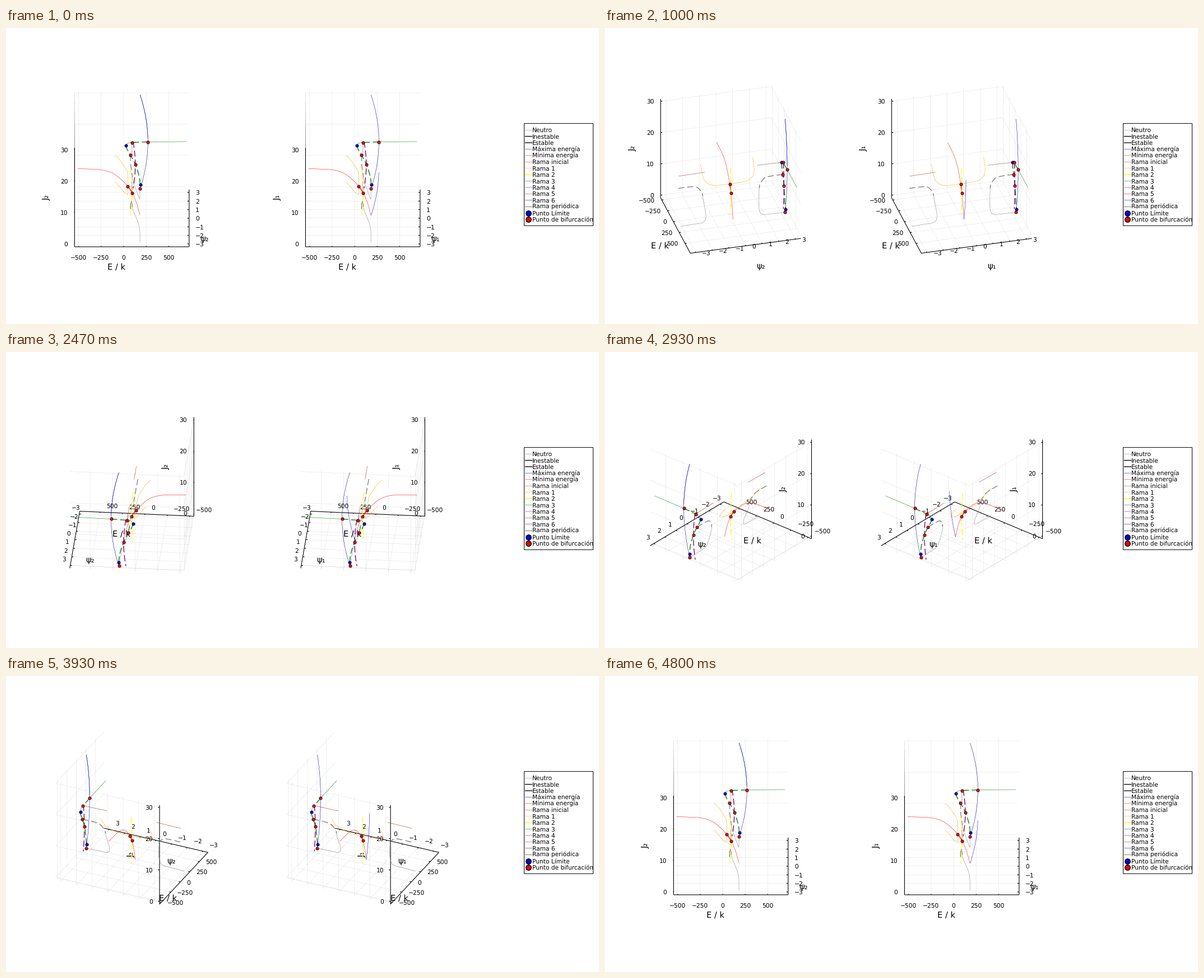
A matplotlib script for the animation above (4.87 s loop, 1058 by 529 pixels).

```python
import numpy as np
import matplotlib.pyplot as plt
from matplotlib.animation import FuncAnimation
from matplotlib.collections import LineCollection
from matplotlib.patches import Rectangle

W, H = 1058, 529
LOOP_MS, STEPS, HOLD = 4870, 73, 3      # 73 camera steps of 5 degrees
CENTERS, CY, HALF = (224.5, 636.6), 251.4, 102.2
SIN_EL, COS_EL = 0.5, np.sqrt(3) / 2
TICK_SIZE, LABEL_SIZE = 10.67, 14.67
THIN, THICK = 0.52, 1.35
GAP = np.full((1, 3), np.nan)

plt.rcParams.update({"font.family": "DejaVu Sans", "lines.scale_dashes": False,
                     "path.snap": False, "text.hinting": "no_hinting"})

# Everything lives in a cube of half side 1; each axis has a 3 % margin.
END = 1 / 1.06                          # psi = pi, J at its extremes


def energy(v):
    return (v - 90.6) / 636.6


def angle(v):
    return v / np.pi * END


def action(v):
    return (v / 14.93 - 1) * END


def smooth(points, n=10):
    """Catmull-Rom curve through the points."""
    p = np.asarray(points, float)
    p = np.vstack([2 * p[0] - p[1], p, 2 * p[-1] - p[-2]])
    t = np.linspace(0, 1, n, endpoint=False)[:, None]
    out = []
    for a, b, c, d in zip(p, p[1:], p[2:], p[3:]):
        out.append(b + 0.5 * t * (c - a + t * (2 * a - 5 * b + 4 * c - d
                                               + t * (3 * (b - c) + d - a))))
    return np.vstack(out + [p[-2:-1]])


def at_psi(psi, ez):
    return [(e, psi, z) for e, z in ez]


def mirror(curve):
    return curve * (1, -1, 1)


def arc(psi, z0, z1, z_mid, e_mid, bend, half):
    z = np.linspace(z0, z1, 40)
    e = e_mid - bend * ((z - z_mid) / half) ** 2
    return np.column_stack([e, np.full_like(z, psi), z])


# Bifurcation and limit points
B_TOP, B_RIGHT, B_LOW = (.002, END, -.0148), (.2808, END, -.0035), (.1419, END, -END)
B_UP, B_MID = (-.0225, END, -.269), (.0607, END, -.4577)
B_RED1, B_RED2 = (-.0714, 0, -.3514), (.0049, 0, -.487)
L_TOP, L_LOW = (-.1057, END, -.076), (.1487, END, -.8734)

minimum = smooth(at_psi(0, [(-.947, 0), (-.634, -.0124), (-.438, -.046), (-.2916, -.12),
                            (-.184, -.2215), (-.0714, -.3514), (.0049, -.487),
                            (.08, -.685), (.1435, -END)]))
branch1 = smooth([B_RED1, (-.07, .2, -.345), (-.07, .342, -.3175), (-.095, .42, -.265),
                  (-.135, .455, -.213), (-.2, .47, -.107), (-.2916, END / 2, 0)])
branch2 = arc(0, 0, -END, -END / 2, .005, .025, END / 2)
branch3_end = np.array([(.944, END, .002), B_RIGHT])
branch3_top = np.array([B_RIGHT, B_TOP])
branch3_turn = smooth([B_TOP, (-.07, END, -.028), L_TOP])
branch3_down = smooth([L_TOP, (-.08, END, -.16), B_UP, B_MID, (.127, END, -.69), L_LOW])
branch4 = arc(END, 0, -END, -END / 2, .0607, .04, END / 2)
branch5 = np.array([(.003, END / 2, 0), (.003, END, -.008)])
branch6 = arc(END, END, -END, 0, .2808, .137, END)
loop_dash = smooth([B_UP, (-.021, .767, -.268), (-.018, .615, -.29),
                    (0, .529, -.391), (.01, .51, -.47)])
loop_thin = smooth([(.01, .51, -.47), (.024, .503, -.5566), (.11, .479, -.808),
                    (.138, .532, -.922), (.142, .724, -.936), B_LOW])
maximum = (arc(END, .075, END, 0, .2808, .137, END),
           arc(0, -.075, -END, 0, .2808, .137, END))

DASH = (0, (11, 5))
SERIES = [  # colour, width, style, curves
    ("gray", THIN, "-", [loop_thin, mirror(loop_thin), np.array([L_LOW, B_LOW])]),
    ("gray", THICK, DASH, [loop_dash, mirror(loop_dash)]),
    ("red", THIN, "-", [minimum]),
    ("red", THICK, "-", [smooth([B_RED1, (-.03, 0, -.42), B_RED2])]),
    ("orange", THIN, "-", [branch1, mirror(branch1)]),
    ("yellow", THICK, DASH, [branch2]),
    ("green", THIN, "-", [branch3_end, branch3_turn]),
    ("green", THICK, DASH, [branch3_top, branch3_down]),
    ("purple", THICK, DASH, [branch4]),
    ("brown", THIN, "-", [branch5, mirror(branch5)]),
    ("navy", THIN, "-", [branch6]),
]
MARKERS = [("blue", [L_TOP, L_LOW]),
           ("red", [B_TOP, B_RIGHT, B_UP, B_MID, B_LOW, B_RED1, B_RED2])]

E_TICKS = [-500, -250, 0, 250, 500]
PSI_TICKS = [-3, -2, -1, 0, 1, 2, 3]
J_TICKS = [0, 10, 20, 30]


def build_grid():
    segs = []
    for e in map(energy, E_TICKS):
        segs += [[(e, -1, -1), (e, 1, -1)], [(e, 1, -1), (e, 1, 1)]]
    for p in map(angle, PSI_TICKS):
        segs += [[(-1, p, -1), (1, p, -1)], [(-1, p, -1), (-1, p, 1)]]
    for z in map(action, J_TICKS):
        segs += [[(-1, 1, z), (1, 1, z)], [(-1, -1, z), (-1, 1, z)]]
    return np.array(segs, float)


def build_axes():
    tick = 0.03
    segs = [[(-1, -1, -1), (1, -1, -1)], [(1, -1, -1), (1, 1, -1)],
            [(-1, -1, -1), (-1, -1, 1)]]
    segs += [[(e, -1, -1), (e, -1 + tick, -1)] for e in map(energy, E_TICKS)]
    segs += [[(1, p, -1), (1 - tick, p, -1)] for p in map(angle, PSI_TICKS)]
    segs += [[(-1, -1, z), (-1, -1 + tick, z)] for z in map(action, J_TICKS)]
    return np.array(segs, float)


GRID, AXES = build_grid(), build_axes()


def project(points, azimuth, cx):
    e, p, z = np.moveaxis(np.asarray(points, float), -1, 0)
    a = np.radians(azimuth)
    x = cx + HALF * (e * np.cos(a) + p * np.sin(a))
    depth = p * np.cos(a) - e * np.sin(a)
    return np.stack([x, CY - HALF * (COS_EL * z + SIN_EL * depth)], -1)


def project_both(points, azimuth):
    return np.concatenate([project(points, azimuth, cx) for cx in CENTERS])


def tick_offset(phase):
    """Alignment and shift of tick labels for an axis turned by phase degrees."""
    phase %= 360
    if phase < 90:
        return "left", 11.3, 0.5
    if phase == 90:
        return "center", 0, 19
    if phase <= 180:
        return "right", -12, 0.2
    if phase < 270:
        return "left", -14, -11.2
    if phase == 270:
        return "center", 0, -11.2
    return "left", 11.3, -11.2


fig = plt.figure(figsize=(W / 72, H / 72), dpi=72, facecolor="white")
ax = fig.add_axes([0, 0, 1, 1])
ax.set(xlim=(0, W), ylim=(H, 0))
ax.axis("off")


def add_text(s, size, x=0, y=0, **kw):
    return ax.text(x, y, s, fontsize=size, va="baseline", zorder=3, **kw)


grid = ax.add_collection(LineCollection([], colors="black", alpha=0.1, linewidths=0.6, zorder=1))
frame_lines = ax.add_collection(LineCollection([], colors="black", linewidths=1.1, zorder=2))


def add_line(color, width, style="-"):
    return ax.plot([], [], color=color, lw=width, ls=style, zorder=4,
                   dash_capstyle="butt", solid_capstyle="butt")[0]


lines = []
for color, width, style, curves in SERIES:
    path = np.vstack([part for c in curves for part in (c, GAP)])
    lines.append((add_line(color, width, style), path))
max_lines = [add_line("blue", THIN) for _ in CENTERS]
dots = [(ax.plot([], [], "o", ms=5.2, mfc=color, mec="black", mew=0.8, zorder=5)[0], pts)
        for color, pts in MARKERS]

ticks, titles = [], []                  # (text, axis, point, panel centre)
for cx, sub in zip(CENTERS, "₂₁"):
    places = [("E", v, (energy(v), -1, -1)) for v in E_TICKS]
    places += [("psi", v, (1, angle(v), -1)) for v in PSI_TICKS]
    places += [("J", v, (-1, -1, action(v))) for v in J_TICKS]
    for axis, v, point in places:
        ticks.append((add_text(str(v).replace("-", "−"), TICK_SIZE), axis, point, cx))
    for s, point, shift, turn in [("E / k", (0, -1, -1), (-27.7, 40.5), 0),
                                  ("ψ" + sub, (1, 0, -1), (27.2, 40.9), 0),
                                  ("J" + sub, (-1, -1, 0), (-45.8, 0), 90)]:
        text = add_text(s, LABEL_SIZE, ha="center", rotation=turn, rotation_mode="anchor")
        titles.append((text, point, shift, cx))


def draw_legend():
    ax.add_patch(Rectangle((924.5, 170.6), 123, 182.7, fc="white", ec="black", lw=1, zorder=2))
    rows = [("Neutro", "gray", THIN), ("Inestable", "black", THICK),
            ("Estable", "black", THICK), ("Máxima energía", "blue", THIN),
            ("Mínima energía", "red", THIN), ("Rama inicial", "sienna", THIN),
            ("Rama 1", "orange", THIN), ("Rama 2", "yellow", THICK),
            ("Rama 3", "green", THIN), ("Rama 4", "purple", THIN),
            ("Rama 5", "brown", THIN), ("Rama 6", "navy", THIN),
            ("Rama periódica", "black", THIN),
            ("Punto Límite", "blue", None), ("Punto de bifurcación", "red", None)]
    for i, (name, color, width) in enumerate(rows):
        y = 182.2 + 11.42 * i
        if width:
            ax.plot([926.5, 938.5], [y, y], color=color, lw=width, zorder=3)
        else:
            ax.plot(932.3, y, "o", ms=9.3, mfc=color, mec="black", mew=1.5, zorder=3)
        add_text(name, TICK_SIZE, 939.3, y + 3.9)


draw_legend()


def update(frame):
    azimuth = 5 * min((frame + 1) // HOLD, STEPS - 1) % 360
    grid.set_segments(project_both(GRID, azimuth))
    frame_lines.set_segments(project_both(AXES, azimuth))
    for line, path in lines:
        line.set_data(*project_both(path, azimuth).T)
    for line, path, cx in zip(max_lines, maximum, CENTERS):
        line.set_data(*project(path, azimuth, cx).T)
    for dot, points in dots:
        dot.set_data(*project_both(points, azimuth).T)

    placing = {"E": tick_offset(azimuth + 90), "psi": tick_offset(azimuth),
               "J": ("right", -12, 0)}
    for text, axis, point, cx in ticks:
        align, dx, dy = placing[axis]
        x, y = project(point, azimuth, cx)
        text.set_ha(align)
        text.set_position((x + dx, y + dy + 0.365 * TICK_SIZE))
    for text, point, (dx, dy), cx in titles:
        x, y = project(point, azimuth, cx)
        text.set_position((x + dx, y + dy))
    return []


anim = FuncAnimation(fig, update, frames=STEPS * HOLD, interval=LOOP_MS / (STEPS * HOLD),
                     init_func=lambda: update(0), repeat=True, repeat_delay=0, blit=False)
plt.show()
```
